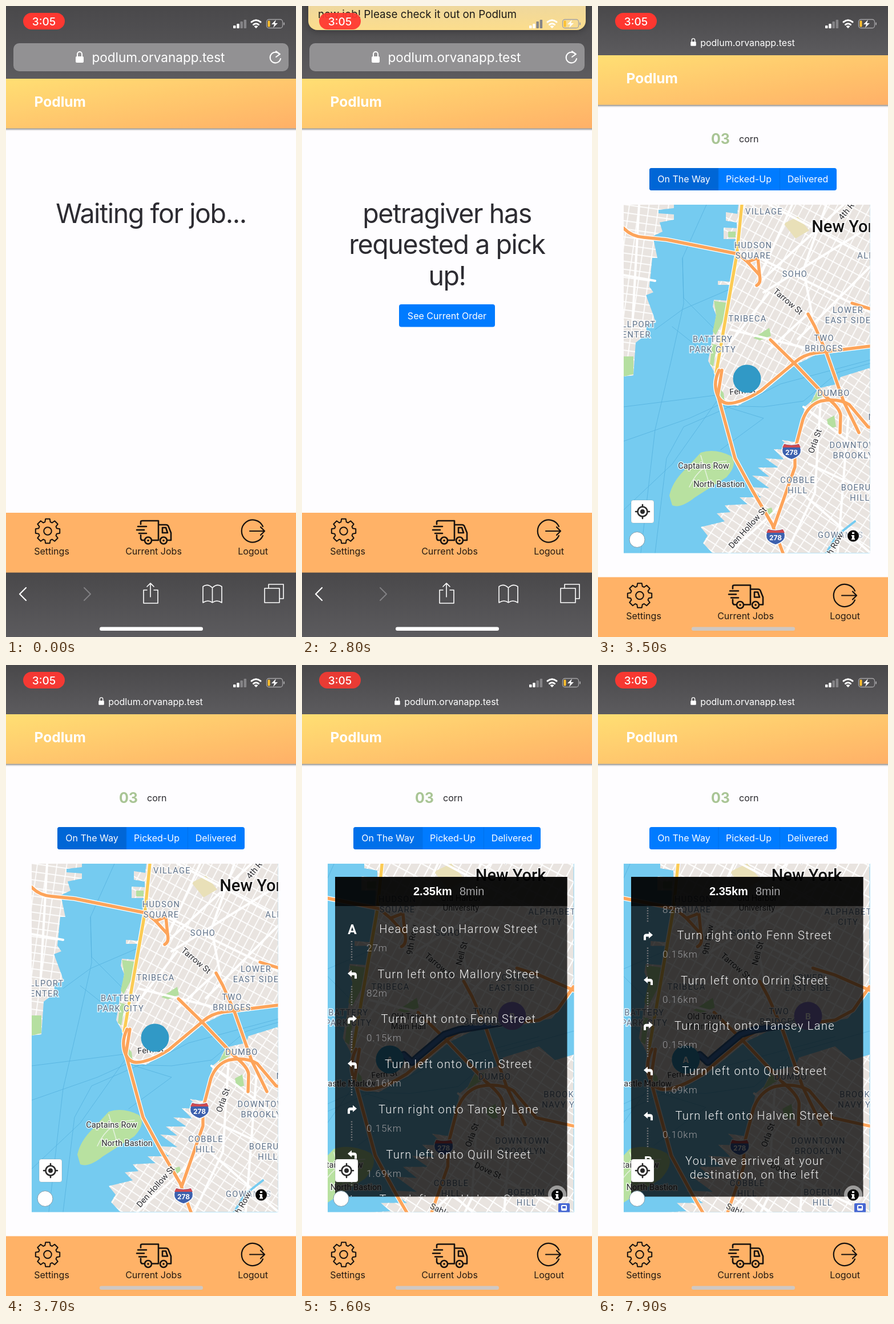
Recreate the animation shown at these times as an HTML page. Size 508 by 1102 pixels, loop 8 s.

```html
<!DOCTYPE html>
<html lang="en">
<head>
<meta charset="utf-8">
<title>Courier jobs</title>
<style>
  html, body { margin: 0; width: 100%; height: 100%; overflow: hidden; background: #fefdff; }
  svg { display: block; width: 508px; height: 1102px; font-family: Inter, sans-serif; }
  .mid { text-anchor: middle; }
  .line { fill: none; stroke-linecap: round; stroke-linejoin: round; }
  #geo path { vector-effect: non-scaling-stroke; }
  #labels text { font-family: Roboto, sans-serif; text-anchor: middle; paint-order: stroke; stroke: #fff; stroke-opacity: .8; stroke-width: 3px; }
  .area { fill: #5d7088; font-size: 14.6px; letter-spacing: 1.3px; }
  .spot { fill: #2c2c30; font-size: 14.6px; }
  .city { fill: #111; font-size: 29px; font-weight: 500; }
  #steps text { font-family: Roboto, sans-serif; font-weight: 300; }
  .turn { fill: #f4f4f4; font-size: 20px; letter-spacing: 1.4px; text-anchor: middle; }
  .dist { fill: #99999c; font-size: 17px; letter-spacing: 1px; }
</style>
</head>
<body>
<svg id="stage" viewBox="0 0 508 1102"></svg>
<script>
const TITLE = 'Podlum', SITE = 'podlum.orvanapp.test';
const text = (x, y, size, str, more = '') => `<text x="${x}" y="${y}" font-size="${size}" ${more}>${str}</text>`;
const rect = (x, y, w, h, fill, r = 0, more = '') => `<rect x="${x}" y="${y}" width="${w}" height="${h}" rx="${r}" fill="${fill}" ${more}/>`;
const line = (d, color, width, more = '') => `<path class="line" d="${d}" stroke="${color}" stroke-width="${width}" ${more}/>`;
const shape = (d, fill, more = '') => `<path d="${d}" fill="${fill}" ${more}/>`;
const circle = (x, y, r, fill, more = '') => `<circle cx="${x}" cy="${y}" r="${r}" fill="${fill}" ${more}/>`;
const group = (id, body, more = '') => `<g id="${id}" ${more}>${body}</g>`;

const streets = (id, w, h, angle) => `<pattern id="${id}" width="${w}" height="${h}" patternUnits="userSpaceOnUse" patternTransform="rotate(${angle})">
  <path d="M0 0H${w}M0 0V${h}" stroke="#fff" stroke-width="3.4"/></pattern>`;
const defs = `<defs>
  <linearGradient id="bar" x2="0" y2="1"><stop stop-color="#49484a"/><stop offset="1" stop-color="#5c5b5e"/></linearGradient>
  <linearGradient id="sun" x2="1" y2="1"><stop stop-color="#ffdf73"/><stop offset="1" stop-color="#ffb067"/></linearGradient>
  <linearGradient id="note" x2="0" y2="1"><stop stop-color="#cbc8c9"/><stop offset=".55" stop-color="#e8d5a6"/><stop offset="1" stop-color="#fcdd8c"/></linearGradient>
  <filter id="drop" x="-10%" y="-20%" width="120%" height="150%"><feDropShadow dx="0" dy="2" stdDeviation="1.6" flood-opacity=".5"/></filter>
  <filter id="soft" x="-10%" y="-20%" width="120%" height="150%"><feDropShadow dx="0" dy="3" stdDeviation="6" flood-opacity=".25"/></filter>
  <clipPath id="mapClip"><rect x="45" y="347" width="431.5" height="608.5"/></clipPath>
  <clipPath id="listClip"><rect x="58" y="421" width="406" height="507"/></clipPath>
  ${streets('uptown', 13, 20, 28)}${streets('brooklyn', 18, 13, 33)}${streets('jersey', 17, 14, 8)}
</defs>`;

function gear(cx, cy) {
  const points = [];
  for (let i = 0; i < 8; i++)
    for (const [da, r] of [[-.29, 16.5], [-.18, 21.5], [.18, 21.5], [.29, 16.5]]) {
      const a = i * Math.PI / 4 + da;
      points.push((cx + r * Math.cos(a)).toFixed(1) + ' ' + (cy + r * Math.sin(a)).toFixed(1));
    }
  return line('M' + points.join('L') + 'Z', '#17120f', 2) + circle(cx, cy, 6.8, 'none', 'stroke="#17120f" stroke-width="2"');
}

const header = y => rect(-4, y, 516, 86.5, 'url(#sun)', 0, 'filter="url(#drop)"') +
  text(49.5, y + 48.5, 24.5, TITLE, 'font-weight="700" fill="#fff"');

const wheel = x => circle(x, 933.5, 6, '#ffb267', 'stroke="#17120f" stroke-width="2.6"') + circle(x, 933.5, 1.8, '#17120f');
const nav = rect(0, 885, 508, 105, '#ffb267') + gear(73, 917) +
  line('M236 905V901Q236 899 239 899H267V933H255M242 933H239Q237 933 236 930V924M268 906H280Q284 906 285 910L289 920V933H284M274 911H280L283 920H274ZM231 909H246M229 915H242M233 921H246', '#17120f', 2.6) +
  wheel(249) + wheel(276) +
  line('M450 909A19.5 19.5 0 1 0 450 925M427 917H452M446 910L453 917L446 924', '#17120f', 2.2) +
  text(80, 958, 16, 'Settings', 'class="mid" fill="#241a12"') +
  text(258.5, 958, 16, 'Current Jobs', 'class="mid" fill="#241a12"') +
  text(432.5, 958, 16, 'Logout', 'class="mid" fill="#241a12"');

const lock = (x, y, k) => `<g transform="translate(${x} ${y}) scale(${k})">${rect(-7, -1, 14, 11, '#fff', 2)}${line('M-4 0V-5A4 4 0 0 1 4 -5V0', '#fff', 2)}</g>`;

const heading = (rows, id) => group(id, rows.map((s, i) =>
  text(254, 379 + i * 54.4, 46.5, s, 'class="mid" fill="#2d2c32" letter-spacing="-1.4"')).join(''));

const waitingPage = group('home',
  header(127) + heading(['Waiting for job...'], 'waiting') +
  group('request', heading(['petragiver has', 'requested a pick', 'up!'], 'who') +
    rect(170, 521, 168, 39.5, '#007bff', 4) + text(254, 546.5, 16, 'See Current Order', 'class="mid" fill="#fff"')) +
  rect(0, 0, 508, 127, 'url(#bar)') + rect(13, 65, 482, 49, '#929193', 10) + lock(129, 89, 1) +
  text(267, 98, 22.5, SITE, 'class="mid" fill="#fff"') +
  line('M479 84A9.3 9.3 0 1 0 481 92M473 79L480 84L473 89', '#fff', 2) + nav +
  rect(0, 989.5, 508, 113, 'url(#bar)') +
  line('M35 1016L24 1027L35 1038', '#fff', 2.2) + line('M137 1016L148 1027L137 1038', '#828184', 2) +
  line('M247 1020H241V1043H266V1020H259M253 1032V1008M247 1014L253 1008L259 1014', '#fff', 1.6) +
  line('M361.5 1016Q353 1008 345 1014V1042Q354 1036 361.5 1042Q369 1036 378 1042V1014Q370 1008 361.5 1016V1042', '#fff', 1.6) +
  line('M453 1017H479V1042H453ZM460 1016V1010H486V1035H480', '#fff', 1.6) +
  rect(164, 1084.5, 181, 6.5, '#fff', 3.2));

// Map geometry: coordinates are those of the first, wider view.
const lands = [
  ['M45 347H133V353L106 356V362L133 364V373L108 378L113 394L96 402L104 440H95L90 490L97 500L84 505L97 540L101 553L83 556L86 572L66 588L62 645L45 647Z', 'jersey'],
  ['M527 347H246L244 363L224 360V375L243 378V388L220 387V407H241L236 482L210 480V487H233L231 515L203 513L201 525L207 540L193 620L204 640L207 680L216 695L245 698L288 675L347 626L380 610L440 601L495 592L512 572L527 548Z', 'uptown'],
  ['M527 644L500 652L477 632L425 648L420 660L385 668L374 690L362 700L355 735L348 762L322 758L340 775L308 774L326 792L293 790L316 806L280 806L300 822L270 820L300 842L262 840L286 858L248 858L262 870L222 872L232 884L208 886L222 900L180 910L192 925L184 938L200 955H527Z', 'brooklyn']
];
const parks = 'M203 515L231 519L222 545L206 575L201 568L207 540ZM200 590L208 592L202 630L196 625ZM205 657L220 676L222 692L213 688ZM272 580L300 562L303 576L284 584ZM228 394H241V404H228ZM45 612H62V643L45 647ZM372 695L385 671L398 670L396 680ZM401 722L414 715L417 735L404 738ZM290 880L304 876L308 888L294 892Z';
const highways = [
  'M45 388Q58 402 80 404L120 408L245 433L262 447L283 470Q286 484 278 488',
  'M212 636Q203 655 207 672Q212 693 228 694Q250 694 285 672L345 622Q360 609 380 606L477 594L503 580L527 546',
  'M217 636L210 680L240 790L270 845L305 905L325 958',
  'M302 583L345 625L400 683Q424 702 425 715L424 745',
  'M368 538L380 560L400 605L430 690L457 745',
  'M527 747L473 735L440 696Q420 684 390 690Q368 697 359 722L345 775L345 805L308 910',
  'M445 519L477 529L527 551', 'M262 447L280 440L283 470'
];
const avenues = 'M262 430L477 535M275 490L430 347M290 500L477 385M300 347L477 440M340 347L285 470M350 582L477 455M215 610L300 500M232 565L375 600M300 600L365 540M400 347L360 460L375 540M360 700L477 790M370 800L500 860M345 840L477 955M390 690L380 850L330 955M230 955L345 850M440 700L420 955M45 470L100 480M72 347L60 560';
const ferries = 'M190 347L148 440L150 520L128 620L100 740L75 955M230 495L148 530L100 565M205 565L150 510L148 440M206 620L130 560M208 690L130 800L45 880M213 696L160 720L45 760M215 698L290 700L360 690L420 640L527 610M225 700L290 720L215 775M45 700L205 680M235 698L150 735L120 790L100 955M240 700L320 660L477 618';
const routePath = 'M260 652L281 644L293 655L303 646L340 615L361 608L423 598L438 588';
const geo = shape('M0 300H600V1000H0Z', '#75cbf0') + line(ferries, '#55b2df', .8) +
  lands.map(([d, grid]) => shape(d, '#e9e4e0') + shape(d, `url(#${grid})`)).join('') +
  shape(parks, '#b5dfa0') + shape('M325 380L350 368L370 392L346 406Z', '#e9e0b8') +
  shape('M125 855Q130 832 150 812L180 780Q205 772 233 786Q246 800 225 823L170 858Q145 878 130 872Z', '#b8e1a0') +
  line('M160 840Q180 795 225 795M180 785L195 835', '#e6f2df', 1.5) +
  line(avenues, '#fff', 4) + line('M400 955L418 925L450 900', '#75cbf0', 4) +
  line('M252 347L243 435L207 640M453 733L457 745', '#fff', 8) + line('M252 347L243 435L207 640M453 733L457 745', '#fbcb55', 5.5) +
  highways.map(d => line(d, '#fff', 8)).join('') + highways.map(d => line(d, '#fda45a', 5.5)).join('') +
  group('route', line(routePath, '#2d5f99', 13) + line(routePath, '#3d78c4', 7));

// x, y, rows, class, angle, visible only after zooming
const labels = [
  [291, 359, 'VILLAGE', 'area'], [272, 427, 'HUDSON|SQUARE', 'area'], [345, 468, 'SOHO', 'area'],
  [262, 546, 'TRIBECA', 'area'], [201, 591, 'BATTERY|PARK CITY', 'area'], [438, 540, 'LOWER|EAST SIDE', 'area'],
  [396, 589, 'TWO|BRIDGES', 'area'], [413, 676, 'DUMBO', 'area'], [453, 776, 'DOWNTOWN|BROOKLYN', 'area'],
  [350, 837, 'COBBLE|HILL', 'area'], [459, 850, 'BOERUM|HILL', 'area'], [425, 924, 'GOWANUS', 'area'],
  [62, 565, 'MILLPORT|CENTER', 'area'], [496, 445, 'ALPHABET|CITY', 'area'], [518, 709, 'BROOKLYN|NAVY YARD', 'area'],
  [436, 385, 'New York', 'city'],
  [333, 516, 'Tarrow St', 'spot', 40], [380, 760, 'Orla St', 'spot', -70], [262, 911, 'Den Hollow St', 'spot', -48],
  [185, 803, 'Captains Row', 'spot'], [212, 835, 'North Bastion', 'spot'], [253, 672, 'Fern St', 'spot', -6],
  [441, 351, '4th Row', 'spot', -50], [412, 945, '4th Row', 'spot', -60],
  [364, 425, 'Old Harbor|University', 'spot', 0, 1], [365, 498, 'Nell St', 'spot', -75, 1], [293, 478, '9th Row', 'spot', -80, 1],
  [288, 596, 'Old Town|Main Hall', 'spot', 0, 1], [202, 686, 'Castle Marlow', 'spot', 0, 1], [403, 811, 'Dove St', 'spot', 25, 1],
  [340, 871, 'Sable St', 'spot', 25, 1]
];
const labelMarkup = labels.map(([, , rows, kind, angle = 0, late]) => {
  const parts = rows.split('|'), gap = kind === 'area' ? 18 : 17;
  return `<g class="pin${late ? ' late' : ''}"><g transform="rotate(${angle})">` + parts.map((s, i) =>
    `<text class="${kind}" y="${(kind === 'city' ? 10 : 5) + (i - (parts.length - 1) / 2) * gap}">${s}</text>`).join('') + '</g></g>';
}).join('');

const shield = shape('M-13 -13Q0 -9 13 -13Q20 0 14 7Q8 13 0 15Q-8 13 -14 7Q-20 0 -13 -13Z', '#3d61ae', 'stroke="#fff" stroke-width="1.5"') +
  shape('M-13 -12Q0 -8 13 -12L16 -6H-16Z', '#cf4a50') + '<text y="7" font-size="12" font-weight="700" text-anchor="middle" fill="#fff">278</text>';
const marker = (letter, fill) => circle(0, 0, 24.5, fill) + `<text class="late" y="6" font-size="15" font-weight="700" text-anchor="middle" fill="#fff">${letter}</text>`;
const pins = [[339, 777, shield], [311, 926, shield], [261, 651, marker('A', '#3199c6')], [438, 588, marker('B', '#8a7bd0'), true]];
const pinMarkup = pins.map(([, , body, late]) => `<g class="pin${late ? ' late' : ''}">${body}</g>`).join('');
const places = [...labels, ...pins];

const turns = [['A', 'Head east on Harrow Street', '27m'], ['L', 'Turn left onto Mallory Street', '82m'],
  ['R', 'Turn right onto Fenn Street', '0.15km'], ['L', 'Turn left onto Orrin Street', '0.16km'],
  ['R', 'Turn right onto Tansey Lane', '0.15km'], ['L', 'Turn left onto Quill Street', '1.69km'],
  ['L', 'Turn left onto Halven Street', '0.10km'], ['B', 'You have arrived at your|destination, on the left', '']];
const steps = turns.map(([icon, name, dist], i) => {
  const y = 461 + i * 78.7, turn = 'M-8 -1L-1 -7V-3H3Q8 -3 8 2V8H4V2H-1V5Z';
  const mark = /[AB]/.test(icon)
    ? `<text x="88" y="${y + 9}" text-anchor="middle" font-size="23" fill="#fff" style="font-weight:700">${icon}</text>`
    : shape(turn, '#fff', `transform="translate(88 ${y}) scale(${icon === 'L' ? 1 : -1} 1)"`);
  return mark + name.split('|').map((s, row) => text(274.5, y + 7 + row * 24.5, 20, s, 'class="turn"')).join('') +
    (dist && text(113, y + 39, 17, dist, 'class="dist"') +
      `<path d="M87 ${y + 21}v34" stroke="#77777a" stroke-width="2.5" stroke-dasharray="2 2.5"/>`);
}).join('');

const panel = group('panel', rect(58, 370, 406.5, 558.5, '#000', 0, 'fill-opacity=".76"') + rect(58, 370, 406.5, 51, '#000', 0, 'fill-opacity=".75"') +
  `<g font-family="Liberation Sans, Arial, sans-serif">${text(195, 402, 20, '2.35km', 'font-weight="700" fill="#fff"')}${text(276, 402, 20, '8min', 'fill="#a5a5a7"')}</g>` +
  `<g clip-path="url(#listClip)">${group('steps', steps)}</g>`);

const mapControls = rect(58, 863, 40, 40, '#fff', 4, 'stroke="#00000022"') +
  circle(78, 883, 8.5, 'none', 'stroke="#292929" stroke-width="2.6"') + circle(78, 883, 4, '#292929') +
  line('M78 871V874M78 892V895M66 883H69M87 883H90', '#292929', 2.6) +
  circle(68.5, 932, 13.5, '#fff', 'stroke="#7f9cac" stroke-width="1"') +
  circle(447, 925, 16, '#fff', 'fill-opacity=".5"') + circle(447, 925.5, 10, '#050505') +
  shape('M445 919h4v3h-4zM444 924h5v6h1v2h-6v-2h1v-4h-1z', '#fff') +
  group('train', rect(449, 940, 20, 20, '#4767d3', 2) + rect(454, 943, 10, 10, '#fff', 2) + rect(456, 945, 6, 4, '#4767d3'), 'class="late"');

const jobPage = group('job', header(86) + rect(0, 0, 508, 86, 'url(#bar)') + lock(167, 63, .68) +
  text(262, 70, 16, SITE, 'class="mid" fill="#fff"') +
  text(198, 241, 25, '03', 'font-weight="700" fill="#a9c595"') + text(247, 237.5, 16, 'corn', 'fill="#29282d"') +
  rect(90, 283, 328, 39, '#007bff', 4) + group('active', shape('M94 283H211V322H94Q90 322 90 318V287Q90 283 94 283Z', '#0066d6')) +
  shape('M210.5 283h1v39h-1zM318 283h1v39h-1z', '#0070ea') +
  [[150.5, 'On The Way'], [264, 'Picked-Up'], [367.5, 'Delivered']].map(([x, s]) => text(x, 308, 16, s, 'class="mid" fill="#fff"')).join('') +
  `<g clip-path="url(#mapClip)">${group('geo', geo)}${group('labels', labelMarkup)}${pinMarkup}${panel}${mapControls}</g>` +
  `<g transform="translate(0 112.5)">${nav}</g>` + rect(164, 1084.5, 181, 6.5, '#cfc8c3', 3.2));

const banner = group('banner', rect(11, 48, 486, 144, 'url(#note)', 16, 'filter="url(#soft)"') +
  rect(25, 63, 27, 27, '#466572', 6) + text(61, 82, 16, 'MESSAGES', 'fill="#4b4640"') +
  text(476, 82, 16, 'now', 'text-anchor="end" fill="#4b4640"') +
  text(28, 121, 19.5, '+1 (000) 555-0123', 'font-weight="600" fill="#1d1a17"') +
  text(28, 146, 18.8, 'Sent from your Brenta trial account - You have a', 'fill="#1d1a17"') +
  text(28, 170.5, 18.8, `new job! Please check it out on ${TITLE}`, 'fill="#1d1a17"'));

const status = rect(30, 12, 73, 29, '#ff3831', 14.5, 'id="pill"') + text(66.5, 33.5, 19, '3:05', 'class="mid" font-weight="500" fill="#fff"') +
  [5, 8, 12, 15].map((h, i) => rect(398 + i * 6.2, 39 - h, 4.5, h, i < 2 ? '#fff' : '#858487', 1)).join('') +
  line('M430 28Q438 21.5 446 28', '#fff', 3) + line('M433.5 32.5Q438 29 442.5 32.5', '#fff', 3) + shape('M434.5 35.5Q438 33 441.5 35.5L438 39Z', '#fff') +
  rect(456.5, 23.5, 28, 15, 'none', 4, 'stroke="#a3a2a5" stroke-width="1.3"') + rect(458.5, 25.5, 4, 11, '#fdc02f', 1.5) +
  rect(486, 28.5, 2, 5, '#a3a2a5', 1) + shape('M473 24L465 32H470L468 38L476 30H471Z', '#fff');

const stage = document.getElementById('stage');
stage.innerHTML = defs + rect(0, 0, 508, 1102, '#fefdff') + waitingPage + jobPage + banner + status;

const el = Object.fromEntries([...stage.querySelectorAll('[id]')].map(node => [node.id, node]));
const pinNodes = [...stage.querySelectorAll('.pin')], lateNodes = [...stage.querySelectorAll('.late, #route, #panel')];
const show = (node, on) => { node.style.display = on ? '' : 'none'; };

const tracks = {
  banner: [[2700, -205], [2800, -150], [2900, -45], [3000, 0], [3200, 0], [3300, -120], [3400, -205]],
  zoom: [[3900, 0], [4000, .15], [4100, .5], [4200, .85], [4300, 1]],
  scroll: [[6500, 0], [6800, 43.5], [7100, 105], [7300, 135], [7500, 146]],
  active: [[5500, 1], [5700, 0]]
};
function valueAt(track, t) {
  const next = track.findIndex(([time]) => time > t);
  if (next === 0) return track[0][1];
  if (next < 0) return track.at(-1)[1];
  const [t0, v0] = track[next - 1], [t1, v1] = track[next];
  return v0 + (v1 - v0) * (t - t0) / (t1 - t0);
}

function draw(t) {
  const onJob = t >= 3400, routed = t >= 3900;
  show(el.home, !onJob);
  show(el.job, onJob);
  show(el.waiting, t < 1000);
  show(el.request, t >= 1000);
  show(el.banner, t >= 2800 && t < 3400);
  el.banner.setAttribute('transform', `translate(0 ${valueAt(tracks.banner, t)})`);
  el.pill.setAttribute('fill-opacity', .9 + .1 * Math.cos(2 * Math.PI * (t / 900 + .07)));
  el.active.setAttribute('opacity', valueAt(tracks.active, t));
  el.steps.setAttribute('transform', `translate(0 ${-valueAt(tracks.scroll, t)})`);
  lateNodes.forEach(node => show(node, routed));

  const z = valueAt(tracks.zoom, t), k = 1 + .21 * z, dx = -162 * z, dy = -98.7 * z;
  el.geo.setAttribute('transform', `matrix(${k} 0 0 ${k} ${dx} ${dy})`);
  pinNodes.forEach((node, i) => node.setAttribute('transform', `translate(${places[i][0] * k + dx} ${places[i][1] * k + dy})`));
}

const start = performance.now();
function tick(now) {
  const t = Math.max(0, now - start) % 8000;
  draw(Math.floor(t / 100) * 100);
  requestAnimationFrame(tick);
}
draw(0);
requestAnimationFrame(tick);
</script>
</body>
</html>
```
